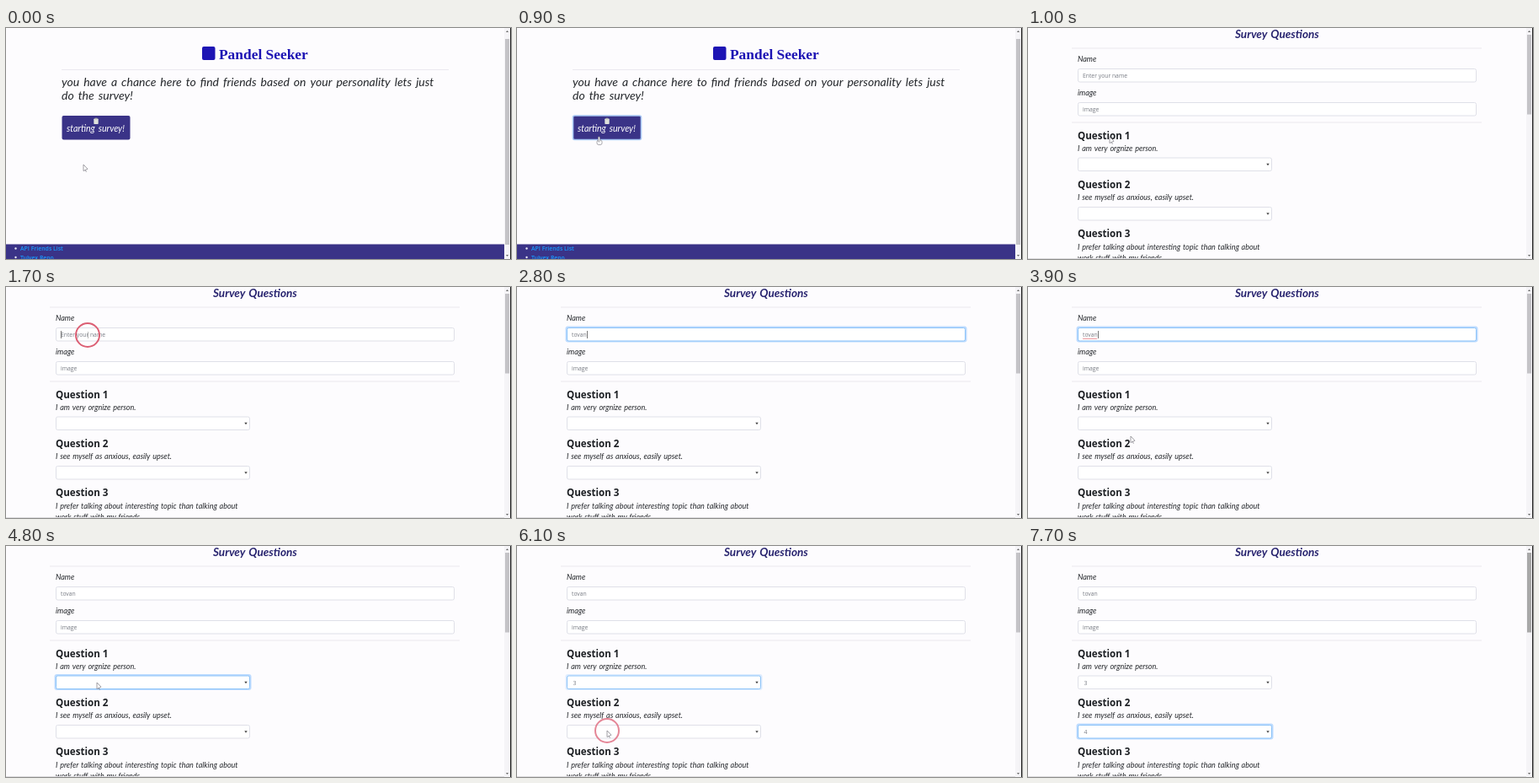
Write an HTML page with a canvas that moves like this. It is 600 by 274 pixels and loops after 8 s.

```html
<!DOCTYPE html>
<html lang="en">
<head>
<meta charset="utf-8">
<title>Survey</title>
<style>
  html, body { margin: 0; width: 100%; height: 100%; overflow: hidden; background: #fdfcfe; }
  canvas { display: block; width: 600px; height: 274px; }
</style>
</head>
<body>
<canvas id="stage" width="600" height="274"></canvas>
<script>
const ctx = document.getElementById('stage').getContext('2d');
const LOOP = 8000, STEP = 100;
const PAGE = '#fdfcfe', INDIGO = '#3a3387', INK = '#24272b', RULE = '#ebe9ef';
const UI = '"Open Sans", sans-serif';
const HAND = 'Lato, sans-serif';

const clamp = v => Math.max(0, Math.min(1, v));
const smooth = v => clamp(v) ** 2 * (3 - 2 * clamp(v));
const between = (t, from, to) => t >= from && t < to;
// Rises from 0 after `from` and is back to 0 at `to`.
const glow = (t, from, to = Infinity) => Math.min(clamp((t - from) / 200), clamp((to - t) / 200));

function rect(x, y, w, h, color) {
  ctx.fillStyle = color;
  ctx.fillRect(x, y, w, h);
}

function box(x, y, w, h, radius, fill, stroke, width = 1) {
  ctx.beginPath();
  ctx.roundRect(x, y, w, h, radius);
  ctx.fillStyle = fill;
  ctx.fill();
  if (!stroke) return;
  ctx.strokeStyle = stroke;
  ctx.lineWidth = width;
  ctx.stroke();
}

function disc(x, y, radius, color) {
  ctx.beginPath();
  ctx.arc(x, y, radius, 0, 2 * Math.PI);
  ctx.fillStyle = color;
  ctx.fill();
}

function triangle(x, y, w, h, color) {
  ctx.beginPath();
  ctx.moveTo(x - w / 2, y);
  ctx.lineTo(x + w / 2, y);
  ctx.lineTo(x, y + h);
  ctx.fillStyle = color;
  ctx.fill();
}

function text(str, x, y, font, color, gap = 0) {
  ctx.font = font;
  ctx.fillStyle = color;
  ctx.wordSpacing = gap + 'px';
  ctx.fillText(str, x, y);
}

const note = (str, y) => text(str, 59, y, `italic 9px ${HAND}`, INK, 0.7);
const inputText = (str, x, y, color = '#777b83') => text(str, x, y, `6.8px ${UI}`, color);

function scrollbar(top, bottom, thumb) {
  rect(592, 0, 7, 274, '#f5f4f7');
  rect(593, top, 5, bottom - top, thumb);
  triangle(595.5, 5, 3, -2, '#666');
  triangle(595.5, 269, 3, 2, '#666');
  rect(599, 0, 1, 274, '#222');
}

function button(focused) {
  box(66.5, 104, 81, 28.5, 2, INDIGO, focused && '#a9c9f5', 1.6);
  box(104.3, 107.5, 5.4, 6.5, 0.8, '#dfe1dc');
  rect(105.7, 106.7, 2.6, 1.6, '#a9aaa5');
  text('starting survey!', 72, 122.5, `italic 10.6px ${HAND}`, '#fff', 1.5);
}

function welcomePage(t) {
  box(233, 22, 15.5, 16, 2, '#1d14b4');
  text('Pandel Seeker', 253, 36.5, 'bold 17.4px "Liberation Serif", serif', '#1d14b4');
  rect(66, 49, 460, 1, RULE);
  ['you have a chance here to find friends based on your personality lets just', 'do the survey!']
    .forEach((str, i) => text(str, 66, 68.7 + i * 16.5, `italic 14px ${HAND}`, INK, 1.7));
  button(t >= 600);

  rect(0, 256.5, 592, 18, INDIGO);
  ['API Friends List', 'Tulvex Repo'].forEach((label, i) => {
    const y = 261.5 + i * 10.5;
    disc(11.5, y, 1.2, '#e8e8f4');
    text(label, 17, y + 2.5, `600 6.9px ${UI}`, '#179bff');
  });
  scrollbar(13, 257, '#c4c3c7');
}

function field(y, width, focus = 0) {
  box(57.5, y - 1.5, width + 3, 19, 3, `rgba(0,123,255,${0.25 * focus})`);
  box(59.5, y + 0.5, width - 1, 15.5, 2, '#fff', focus > 0.3 ? '#8cc3f8' : '#dfe0e8');
}

function select(y, value, focus) {
  field(y, 231, focus);
  inputText(value, 66.5, y + 11);
  triangle(285, y + 7.2, 3.4, 2.6, '#444');
}

function squiggle(from, to, y) {
  ctx.beginPath();
  for (let x = from; x <= to; x++) ctx.lineTo(x, y + Math.cos(x * Math.PI) / 2);
  ctx.strokeStyle = '#e0606a';
  ctx.lineWidth = 0.8;
  ctx.stroke();
}

function nameField(t) {
  const typed = 'tovan'.slice(0, t < 2200 ? 0 : 1 + Math.floor((t - 2200) / 150));
  field(48, 474, glow(t, 1700, 4700));
  inputText(typed || 'Enter your name', 65, 59.3);
  const end = 65 + (typed && ctx.measureText(typed).width);
  if (between(t, 1700, 4500)) rect(Math.round(end), 52, 0.8, 9, '#555');
  if (between(t, 3800, 4500)) squiggle(65, end, 61.3);
}

function question(number, lines) {
  const y = 73.2 + number * 58.3;
  text('Question ' + number, 59, y, `bold 11.6px ${UI}`, '#1d2024');
  lines.forEach((str, i) => note(str, y + 14.5 + i * 13));
}

function surveyPage(t) {
  text('Survey Questions', 246, 11.8, `italic bold 13.5px ${HAND}`, '#28246f', 1);
  rect(52, 23.5, 487, 1, RULE);
  rect(52, 111.5, 487, 1, RULE);
  note('Name', 40);
  nameField(t);
  note('image', 80);
  field(88, 474);
  inputText('image', 65, 99.3);

  question(1, ['I am very orgnize person.']);
  question(2, ['I see myself as anxious, easily upset.']);
  question(3, ['I prefer talking about interesting topic than talking about', 'work stuff with my friends.']);
  select(153.5, t >= 5600 ? '3' : '', glow(t, 4500, 6200));
  select(212, t >= 7100 ? '4' : '', glow(t, 6100));
  rect(0, 273, 592, 1, '#dddce0');
  scrollbar(8, 102.5, t >= 7700 ? '#a8a8a8' : '#c4c3c7');
}

const CURSOR_EDGE = '#88878f';

function arrow(x, y) {
  ctx.beginPath();
  ctx.moveTo(x, y);
  ctx.lineTo(x, y + 7.5);
  ctx.lineTo(x + 5, y + 5.2);
  ctx.closePath();
  ctx.moveTo(x + 2.2, y + 6);
  ctx.lineTo(x + 3.4, y + 8.8);
  ctx.fillStyle = '#fff';
  ctx.fill();
  ctx.strokeStyle = CURSOR_EDGE;
  ctx.lineWidth = 0.8;
  ctx.stroke();
}

function pointingHand(x, y) {
  box(x - 2, y + 4, 6, 5.5, 2, '#fff', CURSOR_EDGE, 0.7);
  box(x - 0.5, y, 1.8, 6, 0.9, '#fff', CURSOR_EDGE, 0.7);
}

const beam = (x, y) => rect(x, y - 4, 0.8, 8, '#aaa');

// Pointer moves: start time, duration, end point.
const MOVES = [
  [100, 500, 97, 129],
  [1000, 500, 97, 57],
  [3400, 200, 121, 134],
  [3700, 200, 122, 177],
  [4200, 300, 108, 162],
  [5600, 400, 107, 219],
  [6200, 200, 99, 213]
];
const CLICKS = [600, 1700, 4500, 6000];

function pointerAt(t) {
  return MOVES.reduce(([x, y], [from, time, toX, toY]) => {
    const k = smooth((t - from) / time);
    return [x + (toX - x) * k, y + (toY - y) * k];
  }, [92, 162]);
}

function pointer(t) {
  const typing = between(t, 2200, 3500) || between(t, 4900, 5600) || t >= 6500;
  if (typing) return;
  const [x, y] = pointerAt(t);
  const shape = t < 1000 && y < 133 ? pointingHand : between(y, 48, 65) ? beam : arrow;
  shape(x, y);
}

function clickRing(t) {
  const click = CLICKS.find(at => between(t, at, at + 300));
  if (click === undefined) return;
  ctx.globalAlpha = 1 - (t - click) / 400;
  ctx.beginPath();
  ctx.arc(...pointerAt(click), 14, 0, 2 * Math.PI);
  ctx.strokeStyle = '#dc5f74';
  ctx.lineWidth = 2;
  ctx.stroke();
  ctx.globalAlpha = 1;
}

function draw(now) {
  const t = Math.floor((now % LOOP) / STEP) * STEP;
  rect(0, 0, 600, 274, PAGE);
  (t < 1000 ? welcomePage : surveyPage)(t);
  clickRing(t);
  pointer(t);
}

const start = performance.now();
function tick() {
  draw(performance.now() - start);
  requestAnimationFrame(tick);
}
tick();
</script>
</body>
</html>
```
